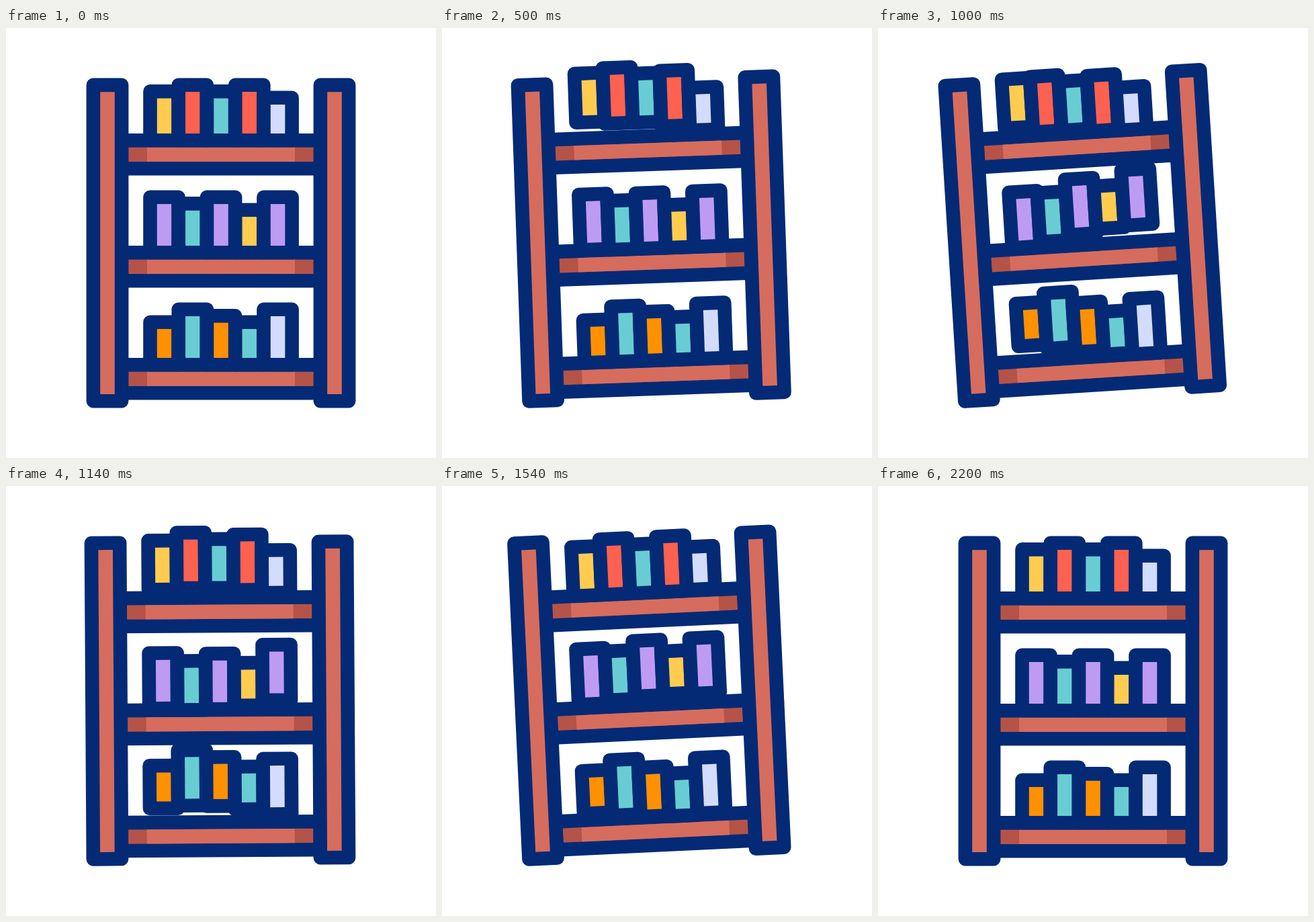
Write an HTML page with a canvas that moves like this. It is 640 px wide and 640 px high and loops after 2.4 s.

```html
<!DOCTYPE html>
<html lang="en">
<head>
<meta charset="utf-8">
<title>Rocking bookshelf</title>
<style>
  html, body { margin: 0; width: 100%; height: 100%; overflow: hidden; background: #fff; }
  canvas { display: block; }
</style>
</head>
<body>
<canvas id="stage" width="640" height="640"></canvas>
<script>
const ctx = document.getElementById('stage').getContext('2d');
const LOOP = 2400, STEP = 20;
const NAVY = '#042a75', WOOD = '#d66c5e', DARK = '#b55348';
const YELLOW = '#ffcc50', RED = '#ff6150', TEAL = '#68cdd2',
      PALE = '#d4dcfd', PURPLE = '#be9bf3', ORANGE = '#ff9100';
const LINE = 20.6, PIVOT = [134, 565];

// Each row: hop start times, then [colour, height] of its books
const rows = [
  { starts: [160, 280, 280, 340, 400],
    books: [[YELLOW, 52.3], [RED, 62], [TEAL, 52.3], [RED, 62], [PALE, 43]] },
  { starts: [460, 520, 580, 640, 700],
    books: [[PURPLE, 62], [TEAL, 52.3], [PURPLE, 62], [YELLOW, 43], [PURPLE, 62]] },
  { starts: [760, 820, 880, 940, 1000],
    books: [[ORANGE, 43], [TEAL, 62], [ORANGE, 52.3], [TEAL, 43], [PALE, 62]] }
];

// [time, degrees]: a rocking motion that dies down
const tilt = [[180, 0], [900, 4.9], [1190, 0], [1632, 3], [1806, 0], [2070, 1], [2200, 0]];

const ease = u => (1 - Math.cos(Math.PI * u)) / 2;

function tiltAt(t) {
  for (let i = 1; i < tilt.length; i++) {
    const [t0, a] = tilt[i - 1], [t1, b] = tilt[i];
    if (t >= t0 && t < t1) return a + (b - a) * ease((t - t0) / (t1 - t0));
  }
  return 0;
}

// Two hops of 600 ms, the second one lower
function hopAt(t) {
  if (t <= 0 || t >= 1200) return 0;
  return (t < 600 ? 25 : 15) * ease(t / 300);
}

function box(color, x, y, w, h) {
  ctx.fillStyle = color;
  ctx.fillRect(x, y, w, h);
}

function outlined(color, x, y, w, h) {
  ctx.fillStyle = NAVY;
  ctx.beginPath();
  ctx.roundRect(x - LINE, y - LINE, w + 2 * LINE, h + 2 * LINE, 10.3);
  ctx.fill();
  box(color, x, y, w, h);
}

function drawRow({ starts, books }, top, t) {
  box(NAVY, 172, top, 296, 62.5);
  box(DARK, 182, top + 20.7, 276, 21.3);
  box(WOOD, 210, top + 20.7, 220, 21.3);
  books.forEach(([color, h], i) =>
    outlined(color, 224.8 + 42.25 * i, top - h - hopAt(t - starts[i]), 21.5, h));
}

function draw(t) {
  ctx.clearRect(0, 0, 640, 640);
  ctx.save();
  ctx.translate(...PIVOT);
  ctx.rotate(-tiltAt(t) * Math.PI / 180);
  ctx.translate(-PIVOT[0], -PIVOT[1]);
  rows.forEach((row, i) => drawRow(row, 157 + 167 * i, t));
  for (const x of [140.2, 478.2]) outlined(WOOD, x, 95.2, 21.6, 449.8);
  ctx.restore();
}

const start = performance.now();
function tick() {
  const t = (performance.now() - start) % LOOP;
  draw(Math.floor(t / STEP) * STEP);
  requestAnimationFrame(tick);
}
tick();
</script>
</body>
</html>
```
